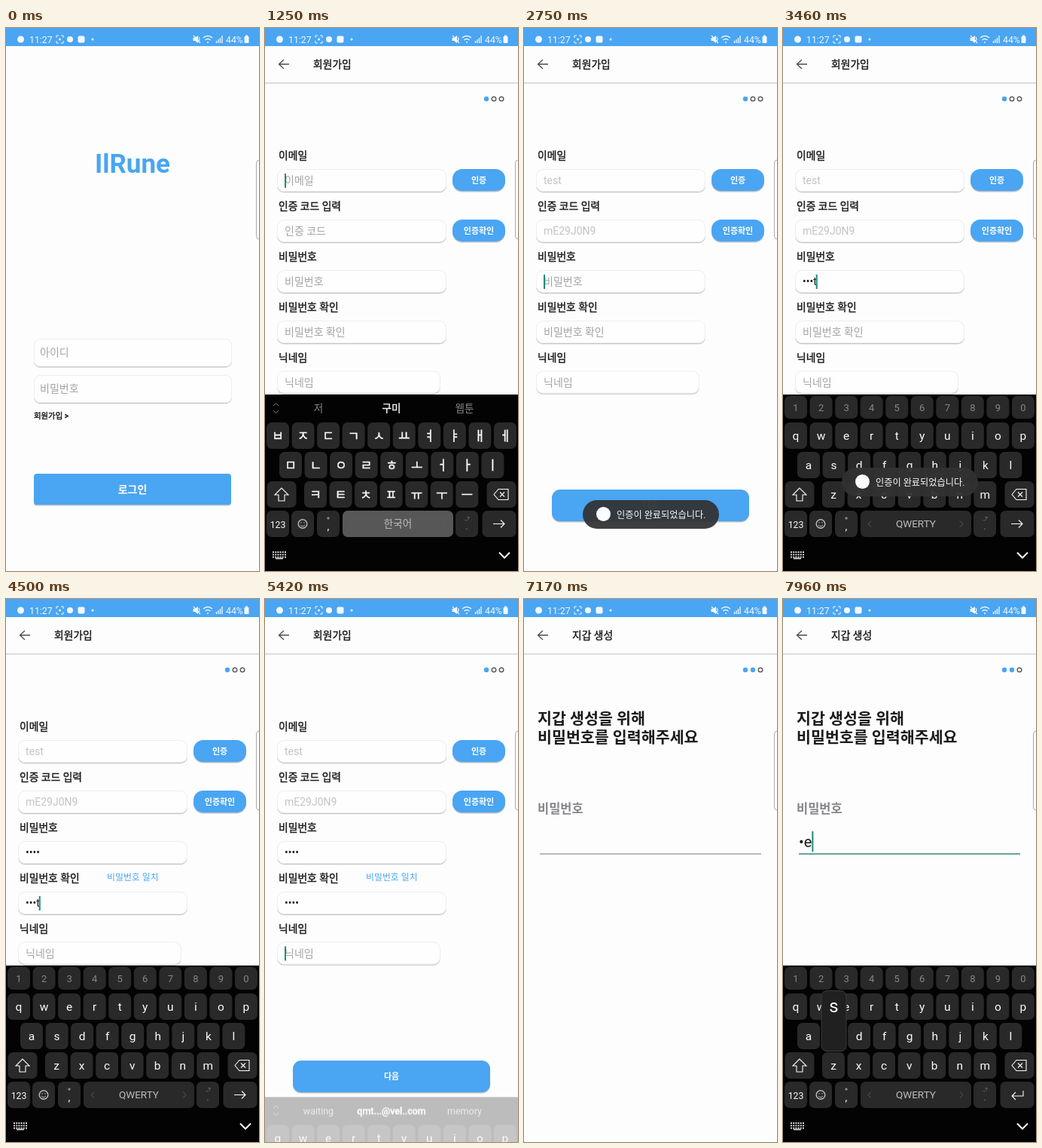
Recreate the animation shown at these times as an HTML page with a canvas. Size 336x720 px, loop 8 s.

```html
<!DOCTYPE html>
<html lang="ko">
<head>
<meta charset="utf-8">
<title>Sign-up flow</title>
<style>
html, body { margin: 0; width: 100%; height: 100%; overflow: hidden; background: #fdfdfe; }
canvas { display: block; width: 336px; height: 720px; }
</style>
</head>
<body>
<canvas id="stage" width="336" height="720"></canvas>
<script>
const W = 336, H = 720, LOOP = 8000, KB_TOP = 486;
const stage = document.getElementById('stage').getContext('2d');
const layer = new OffscreenCanvas(W, H).getContext('2d');
let ctx = stage;

const FONT = 'Roboto, "Noto Sans CJK KR", "Noto Sans CJK", sans-serif';
const PAPER = '#fdfdfe', BLUE = '#4aa5f2', INK = '#1b1b1d', HINT = '#a3a3a5',
  LOCKED = '#c3c3c6', DARK = '#5c5c5f', CURSOR = '#1f8c76';

// Times at which the keyboard starts to rise and to sink
const keyboards = [
  { show: 940, hide: 2370, words: true, korean: 1400 },
  { show: 2800, hide: 4600 },
  { show: 5322, hide: 6112, words: true },
  { show: 7250, hide: 9000, enter: true }
];

// Character i of a text is entered at start + i * step
const fields = [
  { label: '이메일', hint: '이메일', y: 187, w: 225, text: 'test', start: 1500, step: 75, focus: 900, blur: 1900, lock: 1900, button: '인증' },
  { label: '인증 코드 입력', hint: '인증 코드', y: 254, w: 225, text: 'mE29J0N9', start: 1960, step: 50, focus: 1900, blur: 2500, lock: 2500, button: '인증확인' },
  { label: '비밀번호', hint: '비밀번호', y: 321, w: 225, text: 'test', start: 3100, step: 100, focus: 2600, blur: 3700, secret: true },
  { label: '비밀번호 확인', hint: '비밀번호 확인', y: 388, w: 225, text: 'test', start: 3950, step: 130, focus: 3700, blur: 4900, secret: true },
  { label: '닉네임', hint: '닉네임', y: 454.5, w: 217, text: 'test', start: 5720, step: 110, focus: 5280, blur: 6650 }
];
const wallet = { text: 'tes', start: 7740, step: 130, focus: 7200, blur: 9000, secret: true };
const MATCHED = 4340;

const clamp = v => Math.max(0, Math.min(1, v));
const ramp = (t, start, length) => { const u = clamp((t - start) / length); return u * u * (3 - 2 * u); };

function text(str, x, mid, size, color, weight = 400, align = 'left') {
  ctx.font = `${weight} ${size}px ${FONT}`;
  ctx.textAlign = align;
  ctx.fillStyle = color;
  ctx.fillText(str, x, mid + size * 0.37);
  if (weight === 500) { // Hangul has no medium cut, so thicken it slightly
    ctx.strokeStyle = color;
    ctx.lineWidth = 0.4;
    ctx.strokeText(str, x, mid + size * 0.37);
  }
  return ctx.measureText(str).width;
}
const centered = (str, x, mid, size, color, weight) => text(str, x, mid, size, color, weight, 'center');

function box(x, y, w, h, r, fill, stroke) {
  ctx.beginPath();
  ctx.roundRect(x, y, w, h, r);
  if (fill) { ctx.fillStyle = fill; ctx.fill(); }
  if (stroke) { ctx.strokeStyle = stroke; ctx.lineWidth = 1; ctx.stroke(); }
}
function dot(x, y, r, fill, stroke) {
  ctx.lineWidth = 1.4;
  ctx.beginPath();
  ctx.arc(x, y, r, 0, 7);
  if (fill) { ctx.fillStyle = fill; ctx.fill(); }
  if (stroke) { ctx.strokeStyle = stroke; ctx.stroke(); }
}
function line(path, color, width = 1.3) {
  ctx.strokeStyle = color;
  ctx.lineWidth = width;
  ctx.stroke(new Path2D(path));
}

// Draws a group on its own layer, then blends it in as a whole
function faded(alpha, dy, draw) {
  if (alpha <= 0) return;
  layer.clearRect(0, 0, W, H);
  ctx = layer;
  draw();
  ctx = stage;
  ctx.globalAlpha = alpha;
  ctx.drawImage(layer.canvas, 0, dy);
  ctx.globalAlpha = 1;
}

function card(x, y, w, h, r) {
  box(x, y + 1.2, w, h, r, '#c6c6ca');
  box(x, y, w, h, r, '#fefefe');
  box(x + 0.5, y + 0.5, w - 1, h - 1, r, null, '#eeeef1');
}
function button(label, x, y, w, h, r, size) {
  box(x, y + 1.5, w, h, r, '#b9bfc8');
  box(x, y, w, h, r, BLUE);
  centered(label, x + w / 2, y + h / 2, size, '#fff', 700);
}

const typedCount = (f, t) => Math.max(0, Math.min(f.text.length, Math.floor((t - f.start) / f.step) + 1));
function typedText(f, t) {
  const n = typedCount(f, t);
  if (!f.secret || !n) return f.text.slice(0, n);
  const fresh = t - (f.start + (n - 1) * f.step) < 300;
  return fresh ? '•'.repeat(n - 1) + f.text[n - 1] : '•'.repeat(n);
}
function cursor(f, t, x, y, h) {
  if (t < f.focus || t >= f.blur) return;
  const n = typedCount(f, t);
  const since = n ? t - (f.start + (n - 1) * f.step) : t - f.focus;
  if (since % 1000 < 500) { ctx.fillStyle = CURSOR; ctx.fillRect(x, y, 2, h); }
}

function statusBar() {
  const c = '#f2f8fe';
  ctx.fillStyle = BLUE;
  ctx.fillRect(0, 0, W, 24);
  dot(19.5, 15, 4.5, c);
  text('11:27', 31, 15, 12.3, c);
  line('M67 13v-3h3M73 10h3v3M76 17v3h-3M70 20h-3v-3', c, 1);
  dot(71.5, 15, 1.5, c);
  dot(85, 15, 4, c);
  box(95.5, 10.5, 9, 9, 2, c);
  dot(115, 15, 1.5, c);
  ctx.fillStyle = c;
  ctx.fill(new Path2D('M248.500 13h2.500l4-3v10l-4-3h-2.500z'));
  line('M249 10l9 10M256 12q2 3 0 5', c, 1.2);
  line('M262 13q6-5 12 0M264.500 16q3.500-3 7 0M268 18v2', c, 1.5);
  line('M279.500 20v-3M282 20v-5M284.500 20v-7M287 20v-10', c, 1.3);
  text('44%', 292, 15, 12.3, c);
  box(316.5, 11, 6, 9, 1, c);
  ctx.fillRect(318, 9.5, 3, 2);
}

function sheet() { ctx.fillStyle = PAPER; ctx.fillRect(0, 24, W, H - 24); }

function loginPage() {
  sheet();
  centered('IlRune', 168, 179, 35, BLUE, 700);
  card(37, 412, 263, 37, 8);
  text('아이디', 45, 430, 14, HINT);
  card(37, 460, 263, 37, 8);
  text('비밀번호', 45, 478, 14, HINT);
  text('회원가입 >', 37, 514, 10.4, INK, 500);
  button('로그인', 37, 591, 262, 41, 4, 14);
}

function header(title, step) {
  sheet();
  line('M32 48H19M25 42l-6.500 6 6.500 6', '#4b4b4e', 1.3);
  text(title, 64, 48, 13.8, INK, 500);
  line('M0 73H336', '#bcbcc0', 1);
  for (let i = 0; i < 3; i++) {
    const x = 294 + i * 10;
    i < step ? dot(x, 94, 3.2, BLUE) : dot(x, 94, 2.8, null, DARK);
  }
}

function signupPage(t) {
  header('회원가입', 1);
  for (const f of fields) {
    const mid = f.y + 15;
    text(f.label, 18, f.y - 18, 13.8, INK, 500);
    card(16, f.y, f.w, 30, 9);
    if (f.button) button(f.button, 249, f.y, 70, 29, 13, 11);
    const value = typedText(f, t);
    const width = text(value || f.hint, 26, mid, 14, !value ? HINT : t >= f.lock ? LOCKED : INK);
    if (value && !f.secret && t >= f.focus && t < f.blur) {
      ctx.fillStyle = INK;
      ctx.fillRect(26, mid + 7, width, 1);
    }
    cursor(f, t, value ? 25 + width : 26, mid - 9, 19);
  }
  if (t >= MATCHED) text('비밀번호 일치', 134, 369, 11.9, BLUE);
  button('다음', 37, 612, 262, 42, 11, 11);
}

function walletPage(t) {
  header('지갑 생성', 2);
  text('지갑 생성을 위해', 18, 158, 20.6, INK, 700);
  text('비밀번호를 입력해주세요', 18, 183, 20.6, INK, 700);
  text('비밀번호', 18, 278, 16.5, '#86868a', 700);
  const width = text(typedText(wallet, t), 21, 322, 20, INK);
  line('M21 338H315', t < wallet.focus ? HINT : '#2f8a80', 1.6);
  cursor(wallet, t, 21 + width, 308, 27);
}

const LATIN = ['qwertyuiop', 'asdfghjkl', 'zxcvbnm'];
const HANGUL = ['ㅂㅈㄷㄱㅅㅛㅕㅑㅐㅔ', 'ㅁㄴㅇㄹㅎㅗㅓㅏㅣ', 'ㅋㅌㅊㅍㅠㅜㅡ'];
const keyX = (row, i) => [17, 34, 67][row] + i * 33.55;
const keyY = row => 540.5 + row * 39;
const WHITE = '#fafafa', GREY = '#868688', SOFT = '#bdbdbf';
const key = (x, y, w = 30, h = 35, fill = '#29292a') => box(x - w / 2, y - h / 2, w, h, 7, fill);

function topRow(kb, t, korean) {
  if (!kb.words) {
    [...'1234567890'].forEach((d, i) => { key(keyX(0, i), 503, 30, 30); centered(d, keyX(0, i), 503.5, 13, GREY); });
    return;
  }
  line('M11 501l3.500-3.500 3.500 3.500M11 507l3.500 3.500 3.500-3.500', GREY, 1);
  const nick = fields[4], value = kb.show > 5000 ? typedText(nick, t) : '';
  const words = korean ? ['저', '구미', '웹툰'] : value ? ['', value, ''] : ['waiting', 'qmt...@vel..com', 'memory'];
  words.forEach((word, i) => centered(word, 71 + i * 97, 504, value || korean ? 13.6 : 12.5,
    value ? '#6fd0e0' : i === 1 ? WHITE : korean ? GREY : SOFT, i === 1 ? 500 : 400));
}

function keyboard(kb, t) {
  const korean = t < (kb.korean || 0), rows = korean ? HANGUL : LATIN;
  ctx.fillStyle = '#030303';
  ctx.fillRect(0, KB_TOP, W, H - KB_TOP);
  topRow(kb, t, korean);
  rows.forEach((letters, row) => [...letters].forEach((ch, i) => {
    key(keyX(row, i), keyY(row));
    centered(ch, keyX(row, i), keyY(row), korean ? 17 : 15.5, WHITE, korean ? 500 : 400);
  }));
  key(22, 618.5, 39);
  line('M22 610l-9 9h5v8h8v-8h5z', WHITE, 1.1);
  key(314, 618.5, 39);
  line('M304 618.500l6-7h13v14h-13zM312 615.500l6 6M318 615.500l-6 6', WHITE, 1.1);

  key(17, 657.5);
  centered('123', 17, 658, 12.3, WHITE);
  key(50, 657.5);
  dot(50, 657.5, 5.8, null, SOFT);
  line('M47 659q3 3.500 6 0M48 655v1.500M52 655v1.500', SOFT, 1);
  key(84, 657.5);
  dot(84, 650, 1.7, GREY);
  centered(',', 84, 661, 14, WHITE);
  key(176.5, 657.5, 147, 35, korean ? '#575758' : '#29292a');
  centered(korean ? '한국어' : 'QWERTY', 176.5, 657.5, 13.5, SOFT);
  line('M117 653.500l-4 4 4 4M235 653.500l4 4-4 4', DARK, 1);
  key(268, 657.5);
  centered('.,?', 268, 650, 8, GREY);
  centered('.', 268, 660, 13, GREY);
  key(311, 657.5, 45);
  line(kb.enter ? 'M319 652v7h-15M309 654l-5 5 5 5' : 'M303 657.500h15M313 652.500l5 5-5 5', WHITE, 1.1);

  ctx.fillStyle = '#d4d4d6';
  for (let r = 0; r < 3; r++)
    for (let c = 0; c < 6; c++) ctx.fillRect(10 + c * 3.2, 694 + r * 3.3, 2, 2);
  ctx.fillRect(14, 702.5, 10, 1.8);
  line('M311 695.500l7 7 7-7', WHITE, 2);
  if (!korean) pressedKey(t);
}

function pressedKey(t) {
  for (const f of [...fields, wallet]) [...f.text].forEach((ch, i) => {
    const released = f.start + i * f.step;
    if (t >= released || t < released - Math.min(90, f.step * 0.7)) return;
    LATIN.forEach((letters, row) => {
      const col = letters.indexOf(ch);
      if (col < 0) return;
      const x = keyX(row, col), y = keyY(row);
      box(x - 16.5, y - 60, 33, 80, 7, '#202021', '#3c3c3e');
      centered(ch, x, y - 40, 24, WHITE);
    });
  });
}

function toast() {
  box(78, 626, 181, 38, 19, 'rgba(50,50,52,0.94)');
  dot(105.5, 644.5, 9.5, '#fafcff');
  text('인증이 완료되었습니다.', 123, 645, 12.2, WHITE);
}

function draw(t) {
  loginPage();
  const signupIn = ramp(t, 520, 220), walletIn = ramp(t, 6820, 220);
  faded(signupIn, 40 * (1 - signupIn), () => signupPage(t));
  faded(walletIn, 40 * (1 - walletIn), () => walletPage(t));
  box(332.5, 175, 12, 105, 4, '#fff', '#a9a9ad');
  let raised = 0;
  for (const kb of keyboards) {
    const up = ramp(t, kb.show, 300), left = 1 - ramp(t, kb.hide, 300);
    raised = Math.max(raised, up * left);
    faded(up * left * left, (H - KB_TOP) * (1 - up * left), () => keyboard(kb, t));
  }
  faded(ramp(t, 2480, 150) * (1 - ramp(t, 3620, 200)), -43 * raised, toast);
  statusBar();
}

const began = performance.now();
function tick() {
  draw((performance.now() - began) % LOOP);
  requestAnimationFrame(tick);
}
tick();
</script>
</body>
</html>
```
